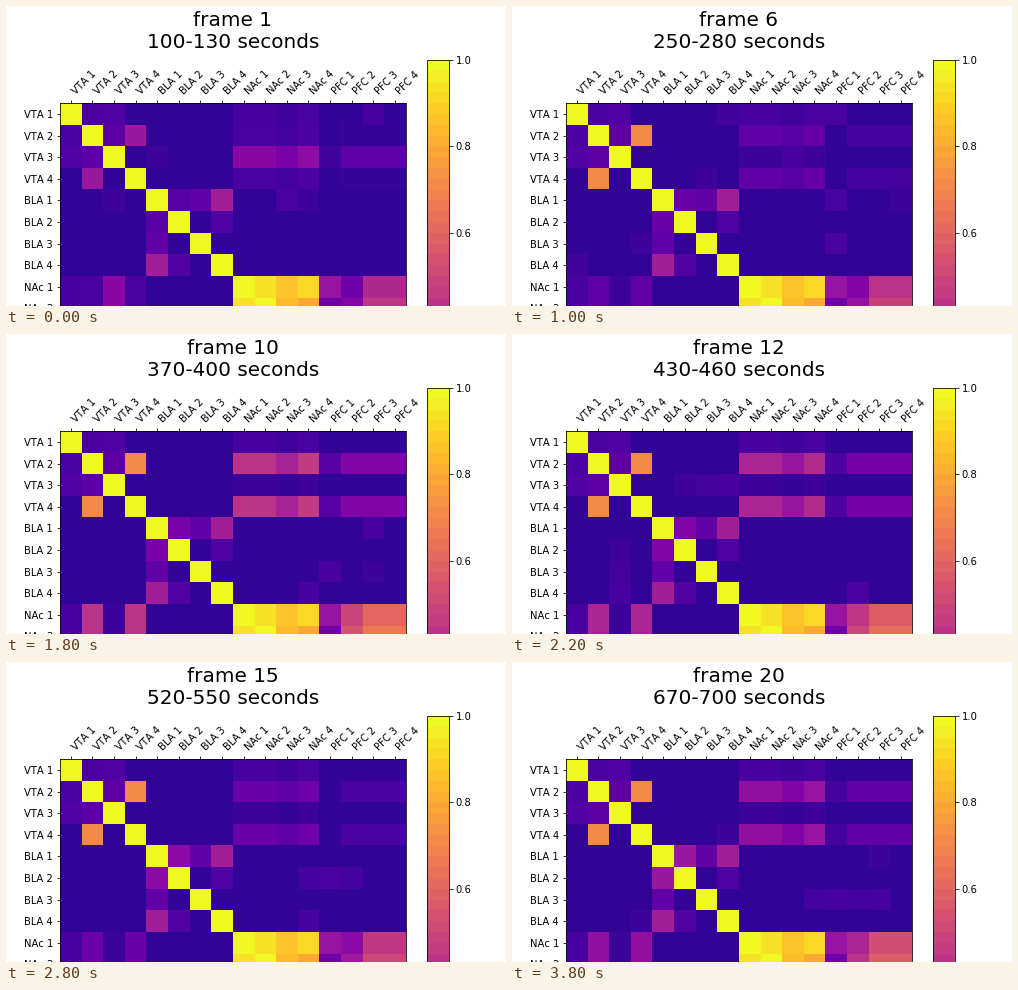
Recreate the animation shown at these times as a matplotlib script. Size 500 by 300 pixels, loop 4 s.

```python
import numpy as np
import matplotlib.pyplot as plt
from matplotlib.animation import FuncAnimation

W, H, DPI = 500, 300, 72
FRAMES, STEP = 20, 200
LEVELS = 40
FLOOR = 2.5
REGIONS = ["VTA", "BLA", "NAc", "PFC"]
LABELS = [f"{name} {i}" for name in REGIONS for i in range(1, 5)]
SIZE = len(LABELS)
VTA, BLA, NAC, PFC = (slice(4 * i, 4 * i + 4) for i in range(4))

# Levels of the steady pairs inside one region
STEADY = {"VTA 1-2": 5, "VTA 1-3": 5.5, "VTA 2-3": 6.5,
          "BLA 1-3": 7, "BLA 1-4": 14, "BLA 2-4": 5.5,
          "NAc 1-2": 37, "NAc 1-3": 34, "NAc 1-4": 36,
          "NAc 2-3": 33.5, "NAc 2-4": 31.5, "NAc 3-4": 34}


def join(grid, pair, level):
    name, ends = pair.split()
    a, b = (LABELS.index(f"{name} {e}") for e in ends.split("-"))
    grid[a, b] = level


def coherence(n):
    """Symmetric channel matrix, scaled to 0..1, for window n."""
    drive = np.interp(n, [0, 5, 9, 11, 14, 16, 19], [5, 7, 17, 15, 8, 7, 12])
    burst = np.exp(-n)
    grid = np.full((SIZE, SIZE), FLOOR)

    # Faint chance coherence, new in every window
    rng = np.random.default_rng(n)
    a, b = rng.integers(0, SIZE, (2, 12))
    grid[a, b] = rng.uniform(3.5, 5, 12)

    for pair, level in STEADY.items():
        join(grid, pair, level)
    join(grid, "VTA 2-4", 28 - 15 * burst)
    join(grid, "BLA 1-2", 6 + 0.37 * n)

    # VTA couples to NAc, and more weakly to PFC
    vta = [4.5, drive, 3.5 + 7.5 * burst, drive]
    grid[VTA, NAC] = np.outer(vta, [1, 1, 0.85, 1.05])
    grid[VTA, PFC] = np.outer(vta, [0.35, 0.6, 0.6, 0.6])

    strong = 12 + 0.7 * drive
    grid[NAC, PFC] = [12.5, 4 + 0.9 * drive, strong, strong]
    grid[NAC.start + 1, PFC] += [-4, 2, 2, 2]

    grid = np.maximum(np.maximum(grid, grid.T), FLOOR)
    np.fill_diagonal(grid, LEVELS - 1)
    return grid / (LEVELS - 1)


def add_axes(x, y, w, h):
    """Axes from pixel coordinates with the origin at the top left."""
    return fig.add_axes([x / W, 1 - (y + h) / H, w / W, h / H])


plt.rcParams["font.family"] = "DejaVu Sans"
plt.rcParams["text.kerning_factor"] = 6
fig = plt.figure(figsize=(W / DPI, H / DPI), dpi=DPI, facecolor="white")

# The stage shows the upper part of a taller plot
ax = add_axes(54, 97.2, 345.6, 345.6)
image = ax.imshow(coherence(0), cmap="plasma", vmin=0, vmax=1,
                  interpolation="nearest", aspect="auto")
ax.xaxis.tick_top()
ax.set_xticks(range(SIZE), LABELS, rotation=45, ha="left")
ax.set_yticks(range(SIZE), LABELS)

bands = plt.cm.ScalarMappable(plt.Normalize(0, 1),
                              plt.get_cmap("plasma", LEVELS))
fig.colorbar(bands, cax=add_axes(421.2, 54, 21.6, 432))

title = fig.text(226.8 / W, 1 - 41.8 / H, "", size=20,
                 ha="center", va="baseline")


def update(n):
    start = 100 + 30 * n
    image.set_data(coherence(n))
    title.set_text(f"frame {n + 1}\n{start}-{start + 30} seconds")
    return image, title


anim = FuncAnimation(fig, update, frames=FRAMES, interval=STEP,
                     repeat=True, repeat_delay=0)
plt.show()
```
